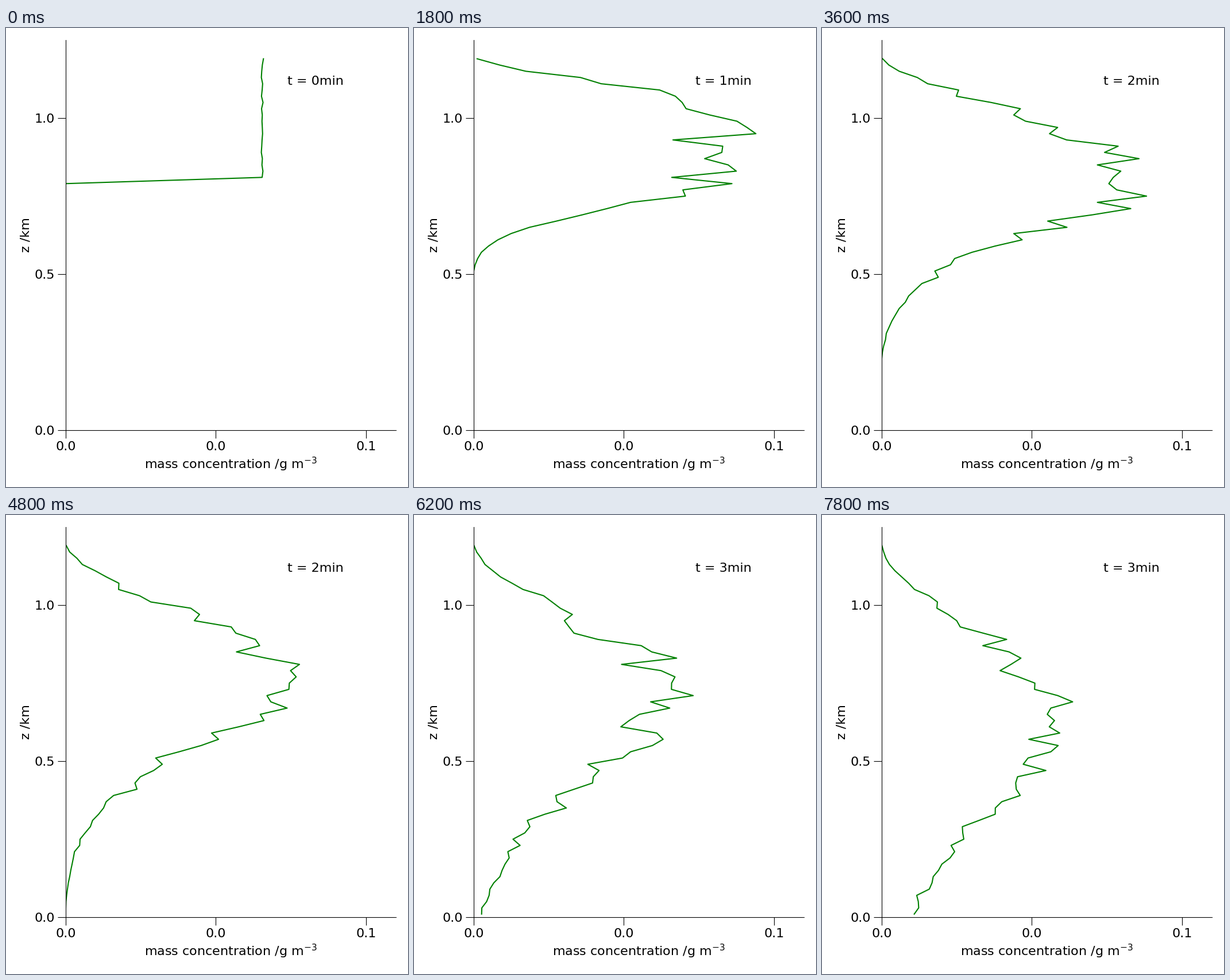
Animation of 700x800 px, one loop 8000 ms. Source, as a matplotlib script:

```python
import numpy as np
import matplotlib.pyplot as plt
from matplotlib.animation import FuncAnimation

W, H, DPI = 700, 800, 100
LEFT, RIGHT, TOP, BOTTOM = 104, 679, 21, 701
FRAMES, INTERVAL, STEP = 40, 200, 5      # STEP: model seconds per frame
CLOUD_BASE, CLOUD_TOP = 800, 1200        # metres

plt.rcParams.update({"font.family": "DejaVu Sans", "font.size": 16})

z = 10 + 20 * np.arange(60)


def slower(speed):
    """Share of the mass falling slower than speed (m/s)."""
    share = 1 - np.exp(-(np.maximum(speed, 0) / 2.35) ** 1.8)
    return np.minimum(1.01 * share, 1)


def mean_profile(t):
    """Layer of droplets spread out by their fall speeds, in pixels."""
    t_safe = max(t, 1e-3)
    peak = 342 + 75 * (1 - np.exp(-t / 15)) + 0.15 * t
    return peak * (slower((CLOUD_TOP - z) / t_safe)
                   - slower(0.87 * (CLOUD_BASE - z) / t_safe))


def profile(i):
    t = i * STEP
    noise = np.random.default_rng(70 + i).normal(size=z.size)
    spread = 0.003 + 0.1 * (1 - np.exp(-t / 15))
    mass = mean_profile(t) * (1 + spread * np.clip(noise, -2.3, 2.3))
    # Keep a single empty level below the lowest droplets
    empty = mass < 0.3
    mass[:-1][empty[:-1] & empty[1:]] = np.nan
    return mass


fig = plt.figure(figsize=(W / DPI, H / DPI), dpi=DPI, facecolor="white")
span = RIGHT - LEFT
ax = fig.add_axes([LEFT / W, 1 - BOTTOM / H, span / W, (BOTTOM - TOP) / H])
ax.spines[["top", "right"]].set_visible(False)
ax.set(xlim=(0, span), ylim=(0, 1.25),
       xlabel="mass concentration /g m$^{-3}$", ylabel="z /km")
ax.set_xticks([0, span / 2.2, span / 1.1], ["0.0", "0.0", "0.1"])
ax.set_yticks([0, 0.5, 1], ["0.0", "0.5", "1.0"])
ax.tick_params(length=10, width=0.8)

line, = ax.plot([], [], color="green", lw=1.5)
clock = fig.text(489.5 / W, 1 - 99 / H, "")


def draw(i):
    line.set_data(profile(i), z / 1000)
    clock.set_text(f"t = {i * STEP / 60:.0f}min")
    return line, clock


anim = FuncAnimation(fig, draw, frames=FRAMES, interval=INTERVAL,
                     init_func=lambda: draw(0), repeat=True, repeat_delay=0)
plt.show()
```
